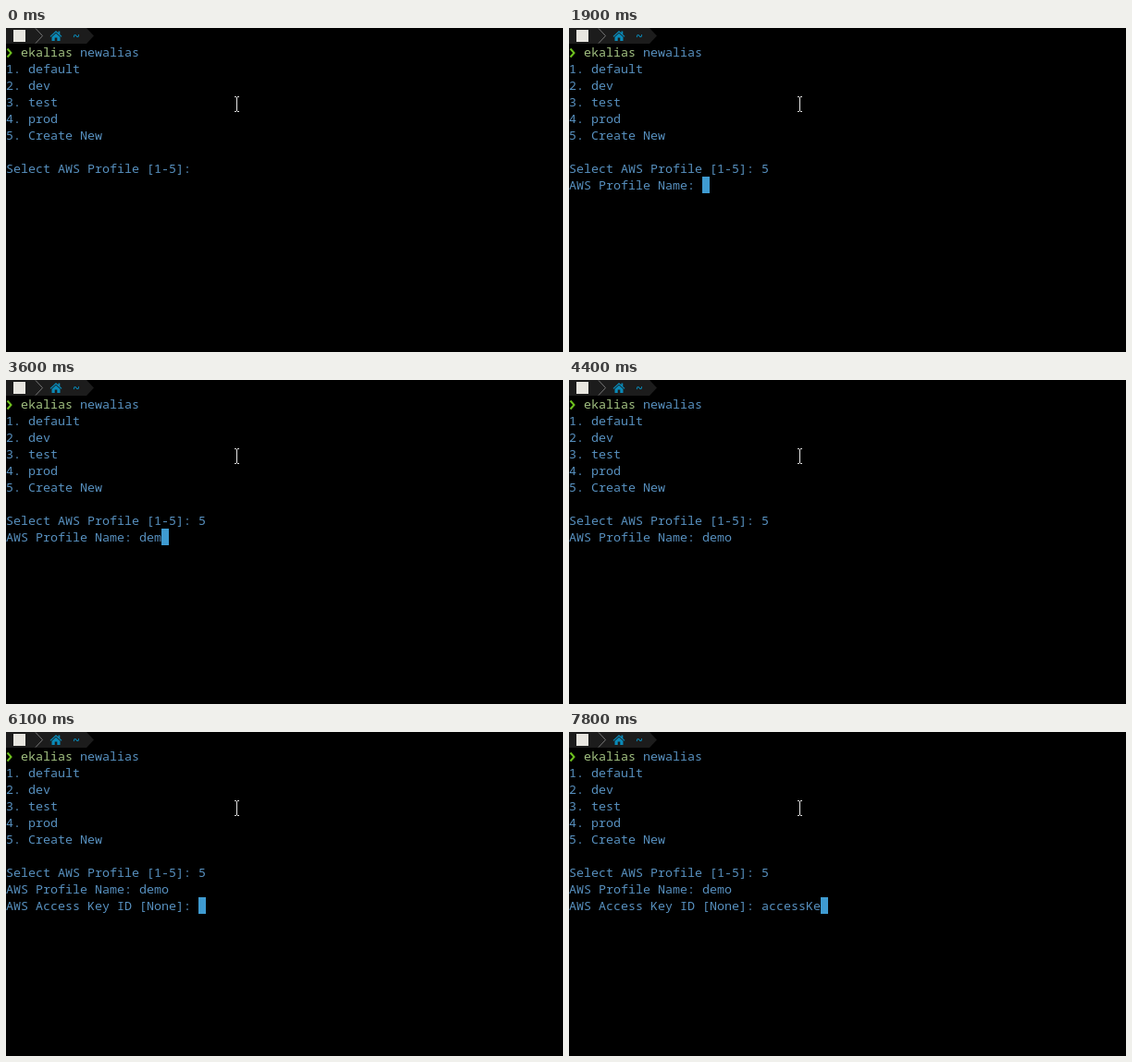
Animation, 602 px wide and 351 px high, one loop 8000 ms. Source, as an HTML page:

```html
<!DOCTYPE html>
<html lang="en">
<head>
<meta charset="utf-8">
<title>Terminal</title>
<style>
  html, body { margin: 0; width: 100%; height: 100%; overflow: hidden; background: #000; }
  svg { display: block; width: 602px; height: 351px; }
  text { font: 13.333px "Noto Sans Mono", "DejaVu Sans Mono", monospace; fill: #5790bf; white-space: pre; }
</style>
</head>
<body>
<svg viewBox="0 0 602 351">
  <rect width="602" height="351" fill="#000"/>
  <path d="M0 0H87L95 8.5L87 17H0Z" fill="#1c1c1c"/>
  <rect x="8" y="2" width="13" height="13" fill="#e8e6e0"/>
  <path d="M32 0.5L39.5 8.5L32 16.5" fill="none" stroke="#777"/>
  <path d="M47.5 9L54 3L56.5 5.3V3.5H58.3V7L60.5 9L59.7 9.8L54 4.8L48.3 9.8ZM49.5 9.7L54 5.8L58.5 9.7V14H55.3V10.5H52.7V14H49.5Z" fill="#0a8ab8"/>
  <text x="72" y="14" style="fill:#0a8ab8;font-weight:700">~</text>
  <path d="M1.5 22.5L5.5 27L1.5 31.5" fill="none" stroke="#6fc31f" stroke-width="2"/>
  <g id="lines"></g>
  <rect id="cursor" width="8" height="18" fill="#3f9bd1"/>
  <text id="under" style="fill:#000"></text>
  <path d="M247 74.5H249M250 74.5H252M249.5 75V90M247 90.5H249M250 90.5H252" fill="none" stroke="#e8e8e8"/>
</svg>
<script>
const LOOP = 8000, CELL = 8, ROW = 18;
const PICK = "Select AWS Profile [1-5]: ";
const NAME = "AWS Profile Name: ";
const KEY = "AWS Access Key ID [None]: ";

// Each step: start time, terminal row, text of that row, cursor shown
const steps = [
  [0, 8, PICK, false],
  [300, 8, PICK, true],
  [900, 8, PICK, false],
  [1500, 8, PICK, true],
  [1700, 8, PICK + "5", true],
  [1900, 9, NAME, true],
  [2600, 9, NAME, false],
  [3100, 9, NAME, true],
  [3400, 9, NAME + "d", true],
  [3600, 9, NAME + "dem", true],
  [3700, 9, NAME + "demo", true],
  [3800, 10, "", true],
  [4400, 10, "", false],
  [5000, 10, KEY, true],
  [5500, 10, KEY, false],
  [6100, 10, KEY, true],
  [6300, 10, KEY + "a", true],
  [6500, 10, KEY + "ac", true],
  [6600, 10, KEY + "acc", true],
  [6700, 10, KEY + "acce", true],
  [6900, 10, KEY + "acces", true],
  [7100, 10, KEY + "access", true],
  [7600, 10, KEY + "access", false],
  [7700, 10, KEY + "accessK", true],
  [7800, 10, KEY + "accessKe", true]
];

const lines = document.getElementById("lines");
const cursor = document.getElementById("cursor");
const rowTop = row => row * ROW - 1;

function addText(row, col, content, color) {
  const el = document.createElementNS("http://www.w3.org/2000/svg", "text");
  el.setAttribute("x", col * CELL);
  el.setAttribute("y", rowTop(row) + 14);
  if (color) el.style.fill = color;
  el.textContent = content;
  lines.append(el);
  return el;
}

addText(1, 2, "ekalias", "#a2c181");
addText(1, 10, "newalias");
["1. default", "2. dev", "3. test", "4. prod", "5. Create New"]
  .forEach((item, i) => addText(i + 2, 0, item));
const prompts = [8, 9, 10].map(row => ({ row, el: addText(row, 0, "") }));

function draw(time) {
  const t = time % LOOP;
  const now = steps.findLastIndex(step => step[0] <= t);
  const [, row, content, shown] = steps[now];
  for (const prompt of prompts) {
    const last = steps.slice(0, now + 1).findLast(step => step[1] === prompt.row);
    prompt.el.textContent = last ? last[2] : "";
  }
  cursor.setAttribute("x", content.length * CELL);
  cursor.setAttribute("y", rowTop(row));
  cursor.setAttribute("visibility", shown ? "visible" : "hidden");
}

const start = performance.now();
function tick() {
  draw(performance.now() - start);
  requestAnimationFrame(tick);
}
tick();
</script>
</body>
</html>
```
